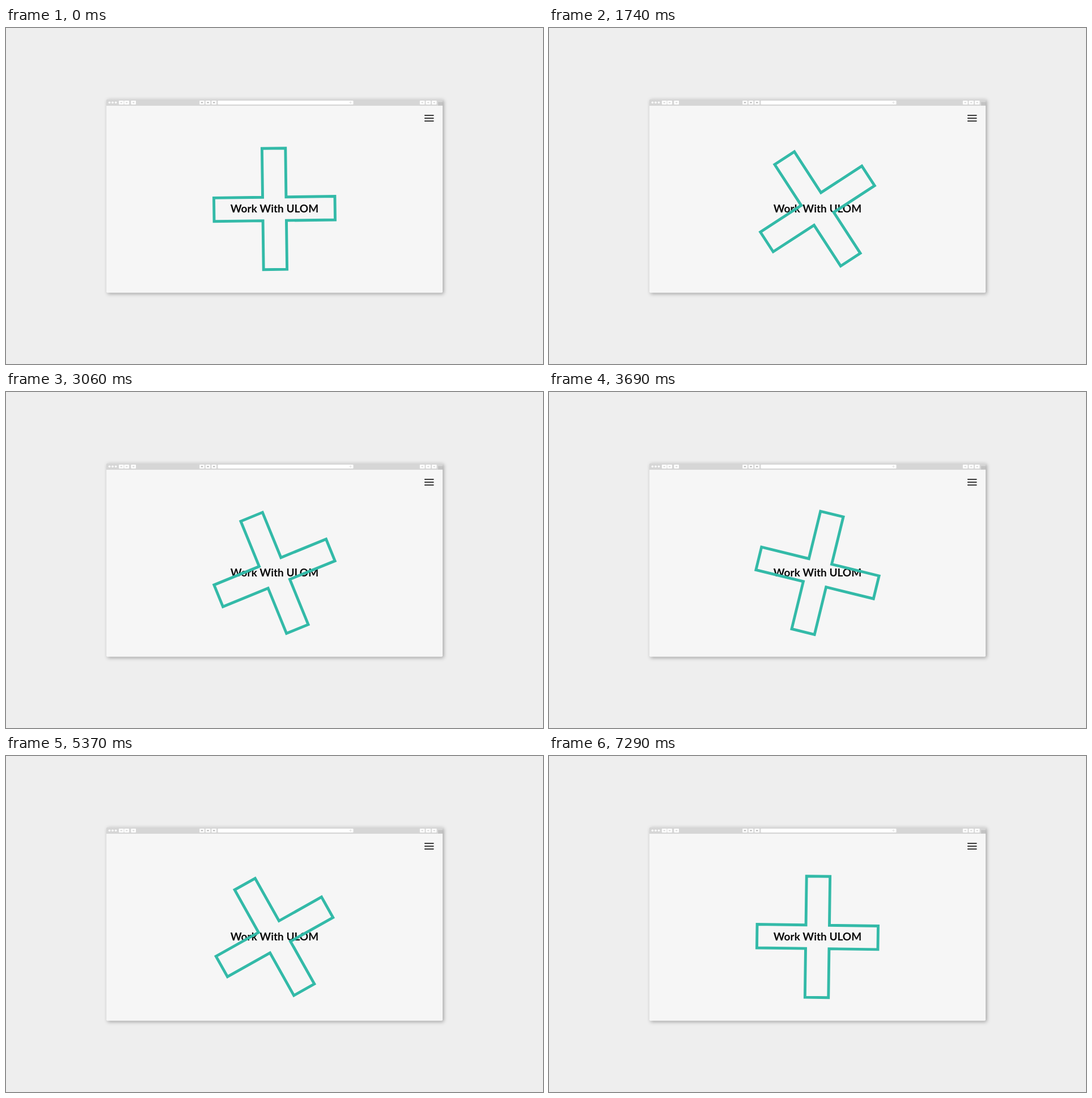
An HTML page for the animation above (7320 ms loop, 947 px wide and 592 px high).

```html
<!DOCTYPE html>
<html lang="en">
<head>
<meta charset="utf-8">
<title>Rotating cross</title>
<style>
  html, body { margin: 0; width: 100%; height: 100%; overflow: hidden; background: #eee; }
  svg { display: block; width: 947px; height: 592px; }
  .page { filter: drop-shadow(2px 2px 3px rgba(0, 0, 0, .32)); }
  .label { font: 700 19px Lato, "Open Sans", sans-serif; text-anchor: middle; fill: #080808; }
  .menu { stroke: #222; stroke-width: 1.6; }
  .cross { fill: none; stroke: #33baa8; stroke-width: 4.9; }
</style>
</head>
<body>
<svg viewBox="0 0 947 592">
  <g class="page">
    <rect x="177" y="125.5" width="593" height="341" rx="2" fill="#f6f6f6"/>
    <path d="M177 137V127.5a2 2 0 0 1 2-2H768a2 2 0 0 1 2 2V137Z" fill="#d6d6d6"/>
  </g>
  <rect x="762" y="130.5" width="8" height="6" fill="#c3c3c3"/>
  <g id="bar" fill="#fff">
    <circle cx="182.5" cy="131.3" r="1.8"/>
    <circle cx="188" cy="131.3" r="1.8"/>
    <circle cx="193.6" cy="131.3" r="1.8"/>
    <rect x="373.5" y="128" width="239" height="6.8" rx="1"/>
    <circle cx="607.5" cy="131.3" r="1.2" fill="none" stroke="#ccc" stroke-width=".7"/>
  </g>
  <path class="menu" d="M738 153.9h16.4M738 158.9h16.4M738 163.9h16.4"/>
  <text class="label" x="473.5" y="325.3">Work With ULOM</text>
  <path class="cross" id="cross"/>
</svg>
<script>
  const LOOP = 7320;
  const SPAN = 204.7;   // steps in one full eased turn
  const START = 0.75;   // tilt at rest, degrees
  const EASE = [0.474, 0.526];
  const cross = document.getElementById('cross');
  const bar = document.getElementById('bar');

  function addRect(x, y, width, height, fill) {
    const r = document.createElementNS('http://www.w3.org/2000/svg', 'rect');
    const attrs = { x, y, width, height, fill, rx: 0.8 };
    for (const key in attrs) r.setAttribute(key, attrs[key]);
    bar.append(r);
  }

  for (const x of [199, 208.5, 220.5, 341.3, 351.8, 362.5, 729.8, 740.3, 750.8]) {
    const middle = x > 300 && x < 400;
    addRect(x, 128, 8.6, 6.8, '#fff');
    addRect(x + 2.5, 130.2, 3.6, 2.3, middle ? '#bbb' : '#ddd');
  }

  // Cross outline: long reach L, half arm width W
  const L = 106.7, W = 20.7;
  cross.setAttribute('d',
    `M${-W} ${-L}H${W}V${-W}H${L}V${W}H${W}V${L}H${-W}V${W}H${-L}V${-W}H${-W}Z`);

  // Four steps per 150 ms, the third held twice as long
  function stepAt(t) {
    if (t < 60) return 0;
    const q = t - 60, r = q % 150;
    return 1 + 4 * Math.floor(q / 150) + (r < 30 ? 0 : r < 60 ? 1 : r < 120 ? 2 : 3);
  }

  function ease(x) {
    let lo = 0, hi = 1;
    for (let k = 0; k < 30; k++) {
      const p = (lo + hi) / 2, n = 1 - p;
      const at = 3 * p * n * n * EASE[0] + 3 * p * p * n * EASE[1] + p * p * p;
      if (at < x) lo = p; else hi = p;
    }
    return lo * lo * (3 - 2 * lo);
  }

  function draw() {
    const t = performance.now() % LOOP;
    const angle = START + 360 * ease(stepAt(t) / SPAN);
    cross.setAttribute('transform', `translate(473.5 318.7) rotate(${-angle})`);
    requestAnimationFrame(draw);
  }
  draw();
</script>
</body>
</html>
```
